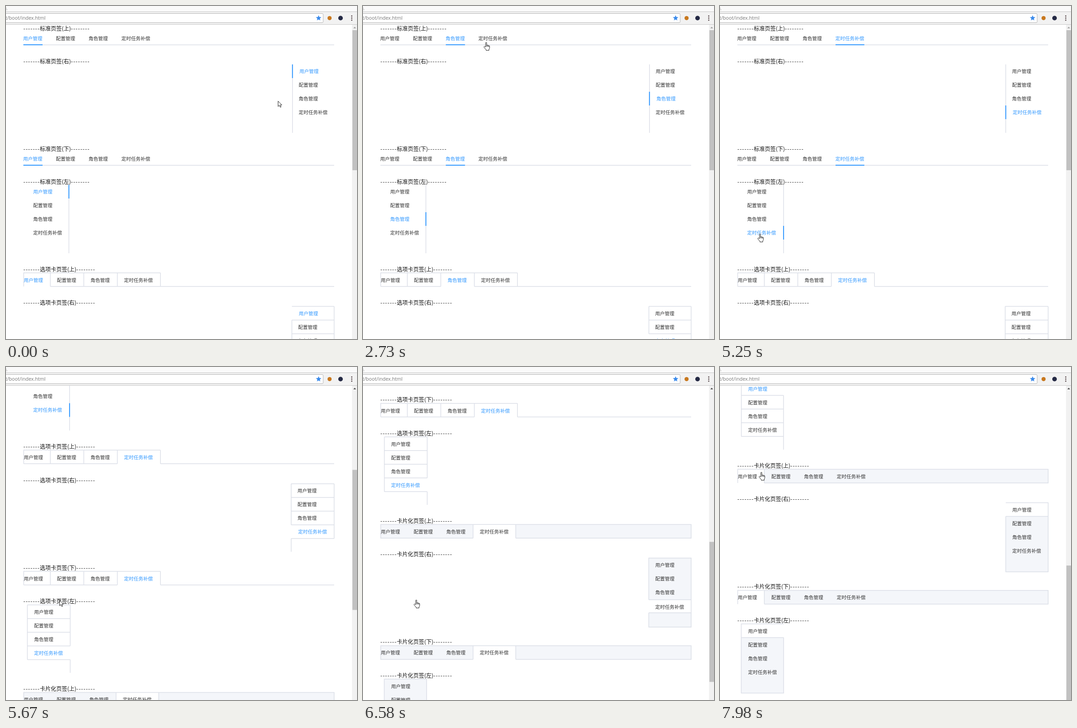
Write an HTML page that moves like this. It is 768x730 px and loops after 8 s.

```html
<!DOCTYPE html>
<html lang="zh">
<head>
<meta charset="utf-8">
<title>页签</title>
<style>
  html, body { margin: 0; width: 100%; height: 100%; overflow: hidden; background: #fff; }
  svg { display: block; width: 768px; height: 730px; }
  text { font: 10.5px "Noto Sans CJK SC", "Noto Sans CJK", sans-serif; fill: #333; white-space: pre; }
  .title { font-size: 12px; fill: #111; }
  .dash { letter-spacing: 1px; }
  .on { fill: #39f; }
  .edge { fill: none; stroke: #dcdfe8; stroke-width: 1.5; }
  .bar { fill: none; stroke: #39f; stroke-width: 2; }
  .panel { fill: #f4f6fa; }
  .blank { fill: #fff; }
  .url { font: 10.7px "Open Sans", sans-serif; fill: #777; }
</style>
</head>
<body>
<svg viewBox="0 0 768 730">
  <g id="page"></g>

  <rect x="757" y="40" width="11" height="690" fill="#f1f1f1"/>
  <path id="up" d="M760 49h6l-3-3.5z"/>
  <rect id="thumb" x="758" width="10" height="307" fill="#c1c1c1"/>

  <rect width="768" height="40" fill="#f2f2f2"/>
  <rect width="768" height="12" fill="#fafafa"/>
  <path d="M0 3Q1 8 3 8.5H0M0 12.5H768M0 40.5H768" fill="none" stroke="#c8c8c8"/>
  <rect x="-5" y="16.5" width="699" height="20" rx="2" fill="#fff" stroke="#b4b4b4"/>
  <text class="url" x="86.5" y="30" text-anchor="end">t/boot/index.html</text>
  <path d="M684 20.3l1.7 3.9 4.3.4-3.3 2.8 1 4.2-3.7-2.2-3.7 2.2 1-4.2-3.3-2.8 4.3-.4z" fill="#3b8beb"/>
  <circle cx="708" cy="26.5" r="4.5" fill="#c8781e"/>
  <circle cx="732" cy="26.5" r="5" fill="#252a45"/>
  <path d="M756.5 22v9.1" stroke="#5a4a4d" stroke-width="2.8" stroke-linecap="round" stroke-dasharray="0 4.5"/>

  <g id="cursor" fill="#fff" stroke="#222" stroke-linejoin="round">
    <path id="arrow" d="M.3.5V12.3L3 9.8 5.1 14 7 13.2 5 9H8.6Z"/>
    <path id="hand" transform="translate(-6.2 -1)" d="M4.5 11V2Q4.5.7 5.7.7T6.9 2V7Q8.2 6 9.2 7.4 10.6 6.5 11.4 8 13.2 7.5 13.2 9.5V12.5Q13 14.5 11.8 16V18.3H5.5V16.8L1 11.5Q.3 10.2 1.4 9.6T4.5 11ZM6.9 7V10.3M9.2 7.4V10.5M11.4 8V10.7"/>
  </g>
</svg>
<script>
const $ = id => document.getElementById(id);
const labels = ['用户管理', '配置管理', '角色管理', '定时任务补偿'];
const widths = labels.map(s => s.length * 10.5);
const LEFT = 38.7, RIGHT = 718, TAB = 30, BORDER = 1.5, LAST = 3;
const STEP = 70, LOOP = 8000;

// Clicks: [time, tab]
const clicks = [[0, 0], [1400, 1], [2240, 2], [3710, 1], [4410, 3], [7630, 0]];
// Wheel turns: [start, duration, distance]
const wheel = [[5320, 488, 500], [6140, 698, 392]];
// Pointer glides: [start, duration, x, y]
const home = [595, 208];
const glides = [
  [420, 560, 124, 79], [1610, 280, 188, 79], [2450, 280, 270, 80], [2870, 350, 88, 486],
  [3360, 140, 98, 432], [4060, 140, 88, 500], [5320, 140, 117, 511],
  [6650, 350, 117, 455], [7070, 350, 66, 230], [7910, 70, 91, 231]
];
// Spans in which the pointer is off the tabs
const arrows = [[0, 910], [2870, 3150], [5390, 6020]];

function ease(t, start, duration) {
  const p = Math.min(1, Math.max(0, (t - start) / duration));
  return p * p * (3 - 2 * p);
}
const scrollAt = t => wheel.reduce((sum, [start, d, dist]) => sum + dist * ease(t, start, d), 0);
const pointerAt = t => glides.reduce(([px, py], [start, d, x, y]) => {
  const p = ease(t, start, d);
  return [px + (x - px) * p, py + (y - py) * p];
}, home);

const text = (x, y, s, cls = '') => `<text x="${x}" y="${y}" class="${cls}">${s}</text>`;
const path = (d, cls = 'edge') => `<path d="${d}" class="${cls}"/>`;
const box = (x, y, x2, y2, cls) =>
  `<rect x="${x}" y="${y}" width="${x2 - x}" height="${y2 - y}" class="${cls}"/>`;
const tabs = (sel, x, y, blue = true) =>
  labels.map((s, i) => text(x(i) - 0.4, y(i) + 4, s, blue && i === sel ? 'on' : '')).join('');

function title(name, y) {
  const base = y + 4.6, end = 74 + (name.length - 2) * 12 + 8;
  return text(38, base, '-------', 'title dash') + text(74, base, name, 'title') +
    text(end, base, '--------', 'title dash');
}

// Each style: row = horizontal tabs, col = vertical tabs
const line = {
  height: 72,
  row(y, sel) {
    const x = i => 38 + 71.6 * i;
    return path(`M38 ${y + 36.3}H${RIGHT}`) +
      path(`M${x(sel)} ${y + 36}h${widths[sel]}`, 'bar') + tabs(sel, x, () => y + 22);
  },
  col(y, sel, right) {
    const grow = sel === LAST ? BORDER : 0, x = right ? 626.8 - grow : 137.6 + grow;
    return path(`M${x} ${y + 7}v150`) + path(`M${x} ${y + 7 + TAB * sel}v${TAB}`, 'bar') +
      tabs(sel, i => right ? x + 14.2 + (i === sel ? BORDER : 0) : 60, i => y + 22 + TAB * i);
  }
};

const card = {
  height: 73.6,
  row(y, sel) {
    const t = y + 8, b = y + 37.7, edges = [LEFT];
    widths.forEach((w, i) => edges.push(edges[i] + w + (i ? 31.3 : 16.3)));
    return path(`M38 ${t}H${edges[4]}` + edges.map(x => `M${x} ${t}V${b}`).join('') +
      `M${LEFT} ${b}H${edges[sel]}M${edges[sel + 1]} ${b}H${RIGHT}`) +
      tabs(sel, i => i ? edges[i] + 15 : 39.5, () => y + 24);
  },
  col(y, sel, right) {
    const grow = sel === LAST ? BORDER : 0, t = y + 8;
    const near = right ? 625.5 - grow : 139 + grow, far = right ? RIGHT : 46.7;
    let d = `M${far} ${t}v${4 * TAB}M${near} ${t}v${TAB * sel}M${near} ${t + TAB * (sel + 1)}V${t + 149}`;
    for (let i = 0; i <= 4; i++) d += `M${near} ${t + TAB * i}H${far}`;
    return path(d) +
      tabs(sel, i => right ? near + 14.2 + (i === sel ? BORDER : 0) : 62, i => y + 23.3 + TAB * i);
  }
};

const filled = {
  height: 73.6,
  row(y, sel) {
    const t = y + 8, b = y + 38;
    const x = i => 39.5 + 71.6 * i + (i && i >= sel ? BORDER : 0);
    const a = sel ? x(sel) - 15 : LEFT, c = x(sel) + widths[sel] + 15.5;
    return box(LEFT, t, RIGHT, b, 'panel') + box(a, t, c, b + 1, 'blank') +
      path(`M${a} ${b}H${LEFT}V${t}H${RIGHT}V${b}H${c}M${a} ${t}V${b}M${c} ${t}V${b}`) +
      tabs(sel, x, () => y + 23.5, false);
  },
  col(y, sel, right) {
    const t = y + 7.8, b = y + 159.3, l = right ? 625.3 : 46.5, r = right ? RIGHT : 139.3;
    const [near, far] = right ? [l, r] : [r, l], nudge = sel ? BORDER : 0;
    const a = t + TAB * sel + nudge, c = t + TAB * (sel + 1);
    return box(l, t, r, b, 'panel') + box(l - 1, a, r + 1, c, 'blank') +
      path(`M${near} ${a}V${t}H${far}V${b}H${near}V${c}M${near} ${a}H${far}M${near} ${c}H${far}`) +
      tabs(sel, () => right ? 640 : 62, i => y + 23.4 + TAB * i + (i === sel ? nudge : 0), false);
  }
};

function render(sel) {
  let y = 49, out = '';
  for (const [kind, style] of [['标准', line], ['选项卡', card], ['卡片化', filled]]) {
    for (const side of '上右下左') {
      const upright = '左右'.includes(side);
      out += title(`${kind}页签(${side})`, y);
      out += upright ? style.col(y, sel, side === '右') : style.row(y, sel);
      y += upright ? 192 : style.height;
    }
  }
  return out;
}

let shown = -1;
function frame() {
  const t = Math.floor(performance.now() % LOOP / STEP) * STEP;
  const sel = clicks.filter(c => c[0] <= t).pop()[1];
  if (sel !== shown) $('page').innerHTML = render(shown = sel);

  const scroll = scrollAt(t);
  $('page').setAttribute('transform', `translate(0 ${-scroll})`);
  $('thumb').setAttribute('y', 53 + scroll * 0.4285);
  $('up').setAttribute('fill', scroll ? '#505050' : '#a3a3a3');

  const arrow = arrows.some(([a, b]) => t >= a && t < b);
  $('cursor').setAttribute('transform', `translate(${pointerAt(t)})`);
  $('arrow').style.display = arrow ? '' : 'none';
  $('hand').style.display = arrow ? 'none' : '';
  requestAnimationFrame(frame);
}
frame();
</script>
</body>
</html>
```
